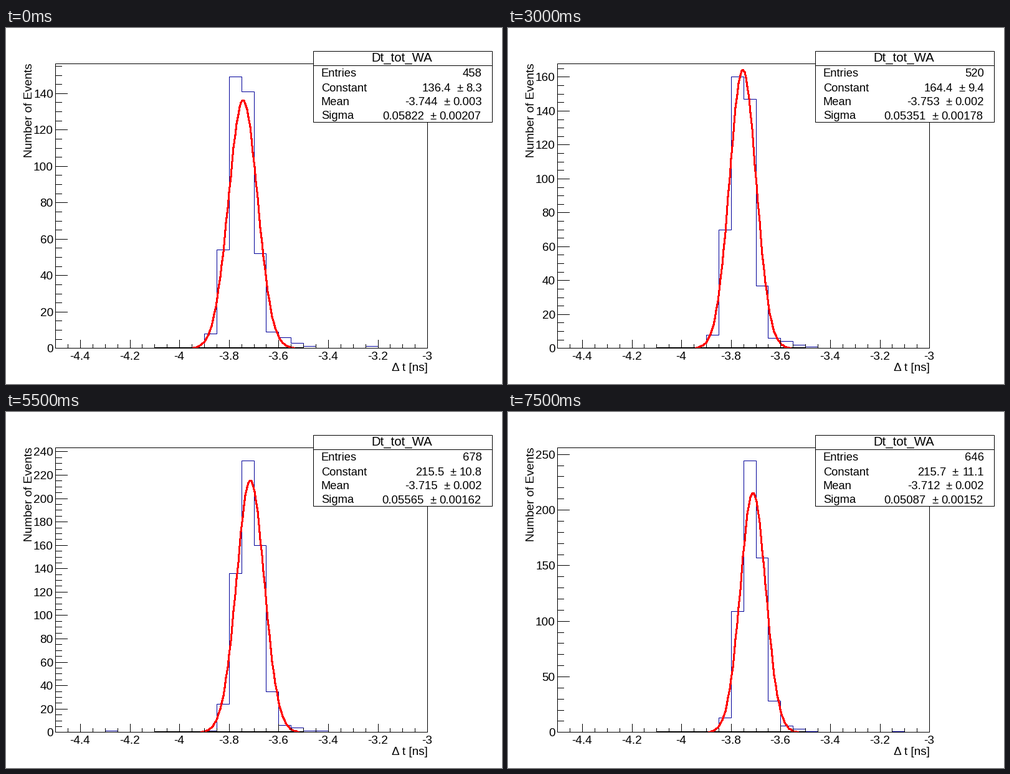
Animation, 796 px wide and 572 px high, one loop 8000 ms. Source, as a matplotlib script:

```python
import numpy as np
import matplotlib.pyplot as plt
from matplotlib.animation import FuncAnimation
from matplotlib.patches import Rectangle

W, H, DPI = 796, 572, 100
PX = 72 / DPI
LEFT, RIGHT, TOP, BOTTOM = 79.6, 676.6, 57.2, 514.8
FRAMES, STEP_MS = 16, 500
BLUE, RED = "#000099", "#ff0000"
CENTRES = -4.475 + .05 * np.arange(30)

# Key points: step, entries, fit constant, mean, sigma, tallest bin
KEYS = np.array([
    (0, 458, 136.4, -3.744, .05822, 149),
    (2, 518, 171.5, -3.745, .05315, 172),
    (4, 521, 156.7, -3.744, .05765, 171),
    (6, 520, 164.4, -3.753, .05351, 160),
    (9, 658, 204.6, -3.716, .05732, 221),
    (12, 688, 220.9, -3.714, .05482, 238),
    (15, 646, 215.7, -3.712, .05087, 244),
])

plt.rcParams["font.family"] = "Liberation Sans"
fig = plt.figure(figsize=(W / DPI, H / DPI), dpi=DPI, facecolor="white")
ax = fig.add_axes([0, 0, 1, 1])


def fit_at(i):
    return [np.interp(i, KEYS[:, 0], col) for col in KEYS.T[1:]]


def bin_counts(i, const, mean, sigma, peak):
    """Core a little narrower than the fit, a right tail and a stray event."""
    z = (CENTRES - mean) / sigma
    core = 1.18 * const * np.exp(-.5 * ((z + .12) / .86) ** 2)
    tail = 6 * np.exp(-np.abs(z - 2.9))
    counts = np.rint(core + tail)
    counts[counts.argmax()] = peak
    counts = np.minimum(counts, np.rint(peak))
    stray = np.random.default_rng(i).integers(0, 30)
    counts[stray] = max(counts[stray], 1)
    return counts


def x_px(v):
    return LEFT + (v + 4.5) / 1.5 * (RIGHT - LEFT)


def pixel(v):
    return np.floor(np.asarray(v) + 1e-6) + .5


def line(xs, ys, color="black", z=3):
    ax.plot(xs, ys, color=color, lw=PX, zorder=z, snap=False,
            solid_capstyle="butt", solid_joinstyle="miter")


def box(x0, y0, x1, y1, z, fill="none"):
    ax.add_patch(Rectangle((x0, y0), x1 - x0, y1 - y0, fc=fill, ec="black",
                           lw=PX, zorder=z, snap=False))


def label(x, y, s, size=19, ha="left", **kw):
    ax.text(x, y, s, fontsize=size * PX, ha=ha, va="baseline", zorder=7, **kw)


def axes_ticks(y_max):
    for k in range(1, 31):
        v = -4.5 + k * .05
        x = pixel(x_px(v))
        major = k % 4 == 2
        line([x, x], [514, 501 if major else 508])
        if major:
            label(x - .8, 533, f"{v:.1f}".replace(".0", ""), ha="center")
    step, minor = (50, 10) if y_max > 250 else (20, 5)
    for v in range(0, int(y_max) + 1, minor):
        y = pixel(BOTTOM - v / y_max * (BOTTOM - TOP))
        major = v % step == 0
        line([80, 99 if major else 90], [y, y])
        if major:
            label(75.8, y + 6.5, str(v), ha="right")


def measure(right, y, value, error, size=18.5):
    ems = sum(.278 if c == "." else .556 for c in error)
    mid = right - ems * size - 10
    label(right, y, error, size, "right")
    label(mid, y, "±", size, "center")
    label(mid - 14.5, y, value, size, "right")


def stats(n, const, mean, sigma):
    box(493.5, 37.5, 780.5, 151.5, 6, "white")
    line([494, 780], [60.5, 60.5], z=7)
    label(635.5, 54, "Dt_tot_WA", 20.4, "center")
    rows = (78.5, 102.5, 124.5, 146.5)
    for name, y in zip(("Entries", "Constant", "Mean", "Sigma"), rows):
        label(505.8, y, name, 18.4)
    root = np.sqrt(n)
    label(763.8, 78.5, f"{n:.0f}", 18.5, "right")
    measure(764, 101.5, f"{const:.1f}", f"{1.31 * const / root:.1f}")
    measure(763.8, 124.5, f"{mean:.3f}", f"{1.05 * sigma / root:.3f}")
    measure(762, 147, f"{sigma:.5f}", f"{.76 * sigma / root:.5f}")


def draw(i):
    ax.clear()
    ax.set(xlim=(0, W), ylim=(H, 0))
    ax.axis("off")
    n, const, mean, sigma, peak = fit_at(i)
    counts = bin_counts(i, const, mean, sigma, peak)
    y_max = counts.max() * 1.05
    scale = (BOTTOM - TOP) / y_max

    edges = pixel(x_px(-4.5 + .05 * np.arange(31)))
    tops = pixel(BOTTOM - counts * scale)
    line(np.repeat(edges, 2)[1:-1], np.repeat(tops, 2), BLUE, z=2)

    v = np.linspace(-4.1, -3.5, 101)
    height = const * np.exp(-.5 * ((v - mean) / sigma) ** 2) * scale
    seen = height > .6
    line([239, 477], [513.5, 513.5], z=2.5)
    ax.plot(np.rint(x_px(v[seen])), np.rint(BOTTOM - height[seen]),
            color=RED, lw=2 * PX, zorder=2.8, snap=False, antialiased=False)

    box(79.5, 57.5, 676.5, 514.5, 3)
    axes_ticks(y_max)
    label(677, 551, "Δ t [ns]", ha="right")
    label(42, 56.5, "Number of Events", ha="right", rotation=90,
          rotation_mode="anchor")
    stats(n, const, mean, sigma)
    return []


anim = FuncAnimation(fig, draw, frames=FRAMES, interval=STEP_MS,
                     repeat=True, repeat_delay=0, blit=False)
plt.show()
```
